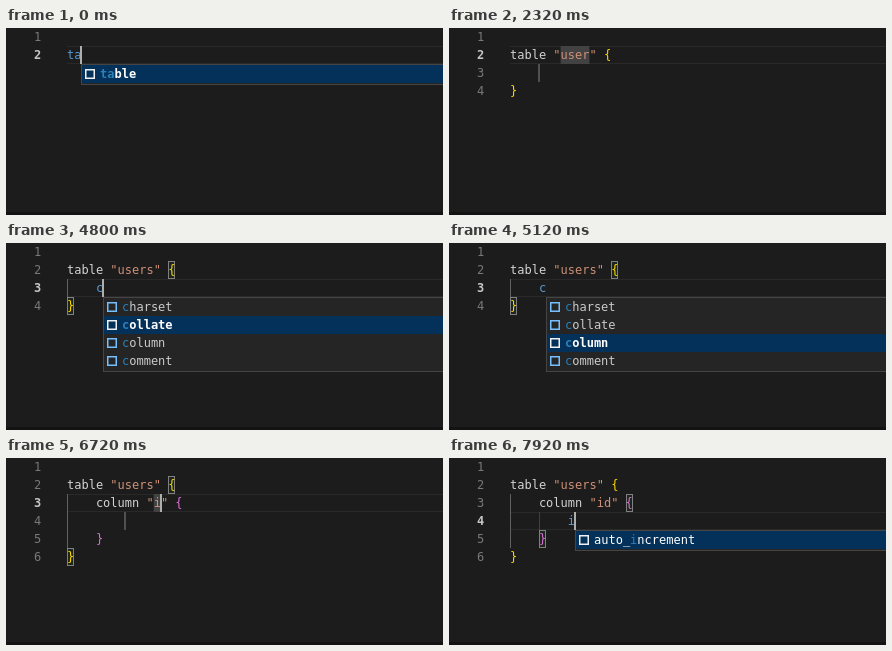
These frames come from a looping animation (437 by 187 pixels, 8000 ms). An HTML page with a canvas:

```html
<!DOCTYPE html>
<html lang="en">
<head>
<meta charset="utf-8">
<title>Editor completion</title>
<style>
html, body { margin: 0; height: 100%; overflow: hidden; background: #1c1c1c; }
canvas { display: block; }
</style>
</head>
<body>
<canvas id="stage" width="437" height="187"></canvas>
<script>
const ctx = document.getElementById('stage').getContext('2d');
const LOOP = 8000, TICK = 80, W = 437, H = 187;
const CHAR = 7.224, LEFT = 61, ROW = 18;
const FONT = '12px "DejaVu Sans Mono", monospace';

const colX = col => LEFT + col * CHAR;
const rowY = row => (row - 1) * ROW;

const table = name => `table "${name}" {`;
const column = name => `    column "${name}" {`;
const outer = (...body) => ['', table('users'), ...body, '}'];
const inner = (name, body = '') => outer(column(name), body, '    }');

// Each edit restarts the cursor blink. match: rows of the boxed braces,
// stop: pending tab stop, field: first column of the active placeholder.
const edits = [{ at: 0, lines: ['', 'ta'], row: 2, col: 2 }];
[[240, ''], [1200, 'u'], [1440, 'us'], [1600, 'use'], [1760, 'user'], [2640, 'users']].forEach(([at, name]) =>
  edits.push({ at, lines: ['', table(name), '', '}'], row: 2, col: 7 + name.length, field: 7, stop: [3, 4] }));
edits.push(
  { at: 2880, lines: outer(''), row: 3, col: 4, match: [2, 4] },
  { at: 4400, lines: outer('    c'), row: 3, col: 5, match: [2, 4], guides: [[0, 3, 3]] });
[[5280, ''], [6480, 'i'], [6800, 'id']].forEach(([at, name]) =>
  edits.push({ at, lines: inner(name), row: 3, col: 12 + name.length, field: 12, stop: [4, 8], match: [2, 6], guides: [[0, 3, 5]] }));
edits.push(
  { at: 7040, lines: inner('id'), row: 4, col: 8, match: [3, 5], guides: [[0, 3, 5]] },
  { at: 7680, lines: inner('id', '        i'), row: 4, col: 9, match: [3, 5], guides: [[0, 3, 5], [4, 4, 4]] });

// Words stay blue until the syntax colouring catches up.
const pending = [[0, 960, 2], [4400, 6000, 3], [7680, LOOP, 4]];

const popups = [
  { from: 0, to: 240, row: 2, col: 2, typed: 'ta', items: ['table'], bold: true },
  { from: 4560, to: 5280, row: 3, col: 5, typed: 'c', items: ['charset', 'collate', 'column', 'comment'], steps: [4800, 4960], bold: true },
  { from: 7840, to: LOOP, row: 4, col: 9, typed: 'i', items: ['auto_increment'] }
];

function rect(x, y, w, h, color) {
  ctx.fillStyle = color;
  ctx.fillRect(x, y, w, h);
}

function frame(x, y, w, h, color, width = 1) {
  ctx.strokeStyle = color;
  ctx.lineWidth = width;
  ctx.strokeRect(x + width / 2, y + width / 2, w - width, h - width);
}

function text(str, x, y, color, bold) {
  ctx.font = (bold ? 'bold ' : '') + FONT;
  ctx.fillStyle = color;
  ctx.fillText(str, x, y);
}

function drawLine(line, row, isPending) {
  for (const { 0: token, index } of line.matchAll(/"[^"]*"|[{}]|\w+/g)) {
    const color = token[0] === '"' ? '#ce9178'
      : /[{}]/.test(token) ? (line[0] === ' ' ? '#da70d6' : '#ffd700')
      : isPending ? '#569cd6' : '#d4d4d4';
    text(token, colX(index), row * ROW - 5, color);
  }
}

function drawPopup({ row, col, typed, items, steps = [], bold }, t) {
  const x = Math.round(colX(col)), top = row * ROW;
  const selected = steps.filter(at => t >= at).length;
  rect(x, top, W, items.length * ROW + 3, '#252526');
  frame(x, top, W, items.length * ROW + 3, '#454545');
  items.forEach((item, i) => {
    const y = top + 1 + i * ROW, active = i === selected;
    if (active) rect(x + 1, y, W, ROW, '#04315a');
    frame(x + 4, y + 4, 10, 10, active ? '#f0f0f0' : '#75beff', 1.5);
    const start = item.indexOf(typed), end = start + typed.length;
    const part = (a, b, color, heavy) => text(item.slice(a, b), x + 19 + a * CHAR, y + 13, color, heavy);
    const color = active ? '#ffffff' : '#cccccc';
    part(0, start, color, active && bold);
    part(start, end, '#2a80b8', active && bold);
    part(end, item.length, color, active && bold);
  });
}

function draw(t) {
  const s = edits.findLast(e => e.at <= t);
  rect(0, 0, W, H, '#1c1c1c');
  rect(0, H - 3, W, 3, '#131313');

  const y = rowY(s.row);
  rect(LEFT, y, W, 1, '#292929');
  rect(LEFT, y + ROW - 1, W, 1, '#292929');

  for (const [col, first, last] of s.guides || [])
    rect(Math.round(colX(col)), rowY(first), 1, (last - first + 1) * ROW, col ? '#404040' : '#606060');
  if (s.stop) rect(Math.round(colX(s.stop[1])) - 1, rowY(s.stop[0]), 2, ROW, '#505050');
  if (s.field) rect(colX(s.field), y, Math.max(1.5, (s.col - s.field) * CHAR), ROW, '#424242');
  for (const row of s.match || []) {
    const x = Math.round(colX(s.lines[row - 1].search(/[{}]/)));
    rect(x, rowY(row), 7, ROW, '#1c261c');
    frame(x, rowY(row), 7, ROW, '#808080');
  }

  s.lines.forEach((line, i) => {
    const row = i + 1, current = row === s.row;
    text(row, 28, row * ROW - 5, current ? '#c6c6c6' : '#787878', current);
    drawLine(line, row, pending.some(([from, to, r]) => r === row && t >= from && t < to));
  });

  if ((t - s.at) % 1000 < 500) rect(Math.round(colX(s.col)) - 1, y, 2, ROW, '#aeafad');
  const popup = popups.find(p => t >= p.from && t < p.to);
  if (popup) drawPopup(popup, t);
}

function loop() {
  const t = performance.now() % LOOP;
  draw(Math.floor(t / TICK) * TICK);
  requestAnimationFrame(loop);
}
loop();
</script>
</body>
</html>
```
